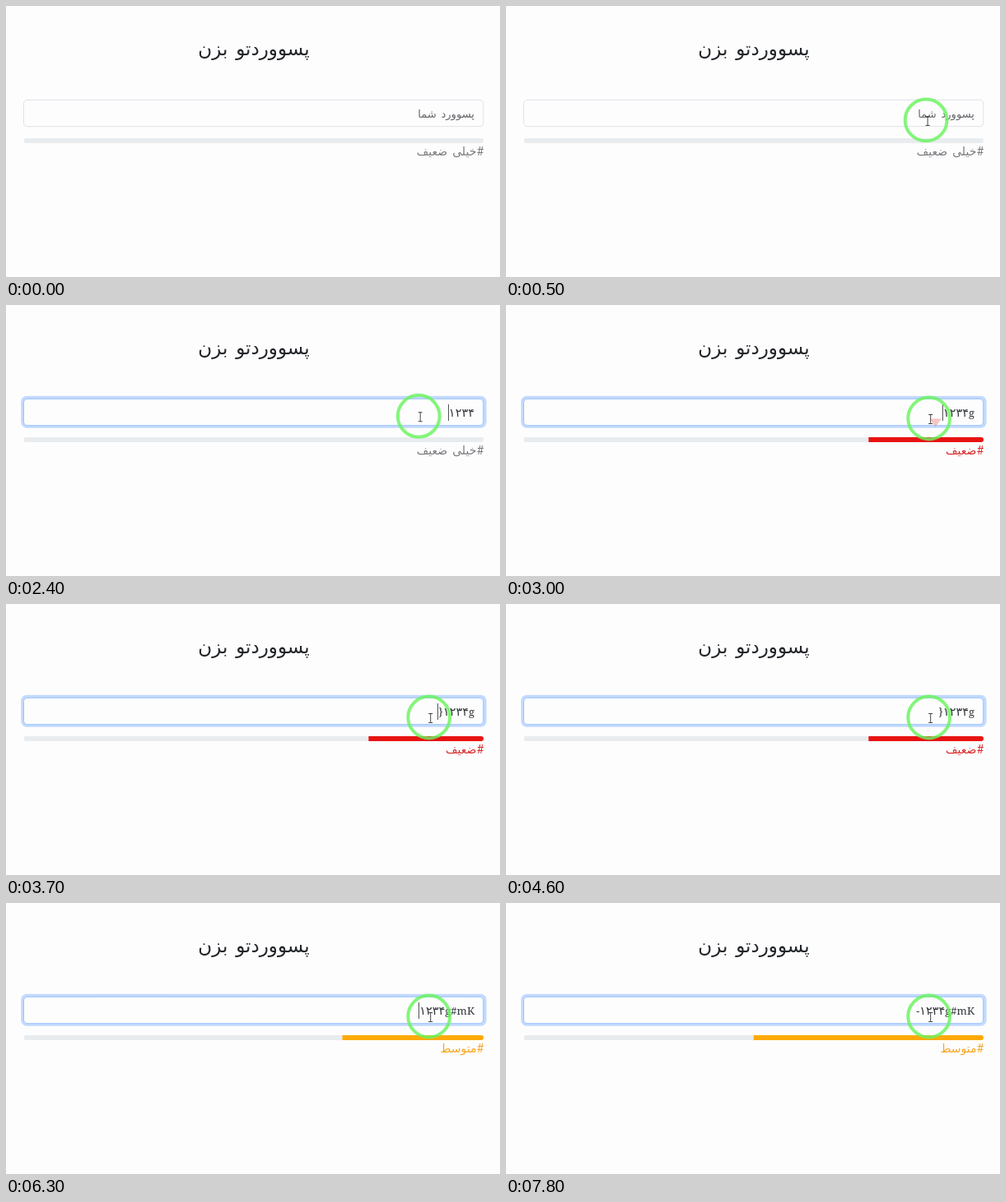
These frames come from a looping animation (600 px wide and 330 px high, 8 s). An HTML page with a canvas:

```html
<!DOCTYPE html>
<html lang="fa">
<head>
<meta charset="utf-8">
<style>
html, body { margin: 0; width: 100%; height: 100%; overflow: hidden; background: #fefdfe; }
canvas { display: block; }
</style>
</head>
<body>
<canvas id="stage" width="600" height="330"></canvas>
<script>
const LOOP = 8000, LEFT = 21.5, RIGHT = 580, BLINK = 250;
const SANS = 'Roboto, "DejaVu Sans", sans-serif', SERIF = '"Noto Serif", serif';
const DIGITS = '"DejaVu Sans", sans-serif';
const ctx = document.getElementById('stage').getContext('2d');

// time, digits, Latin letters, trailing neutral sign
const keys = [
  [960, '۱', '', ''], [1400, '۱۲', '', ''], [1800, '۱۲۳', '', ''], [2200, '۱۲۳۴', '', ''],
  [2500, '۱۲۳۴', 'g', ''], [3700, '۱۲۳۴', 'g', '}'], [4800, '۱۲۳۴', 'g', ''],
  [5100, '۱۲۳۴', 'g', '#'], [5800, '۱۲۳۴', 'g#m', ''], [6200, '۱۲۳۴', 'g#mK', ''],
  [7400, '۱۲۳۴', 'g#mK', '-']
];
const levels = [
  { at: 0, from: 0, to: 0, bar: '#e9ecef', color: '#777a7d', label: '#خیلی ضعیف' },
  { at: 2550, from: 0, to: .25, bar: '#e81313', color: '#d62a2a', label: '#ضعیف' },
  { at: 6250, from: .25, to: .5, bar: '#ffa908', color: '#f5a623', label: '#متوسط' }
];
// time, x, y of the pointer
const path = [[100, 630, 170], [600, 496.5, 136], [1000, 496.5, 135], [1500, 498.5, 135],
  [2300, 500, 135.5], [2850, 513.7, 138.5]];

const clamp = v => Math.max(0, Math.min(1, v));
const smooth = v => v * v * (3 - 2 * v);

// CSS "ease" timing: cubic-bezier(.25, .1, .25, 1)
function ease(x) {
  let lo = 0, hi = 1;
  for (let i = 0; i < 20; i++) {
    const m = (lo + hi) / 2;
    if (.75 * m * (1 - m) + m ** 3 < x) lo = m; else hi = m;
  }
  return .3 * lo * (1 - lo) ** 2 + 3 * lo * lo * (1 - lo) + lo ** 3;
}

// Persian text, with slightly wide word gaps
function persian(str, x, y, size, color, align = 'right') {
  ctx.font = `${size}px ${SANS}`;
  ctx.wordSpacing = size * .18 + 'px';
  ctx.fillStyle = color;
  ctx.textAlign = align;
  ctx.direction = 'rtl';
  ctx.fillText(str, x, y);
}

// One run of typed characters ending at x; returns its left edge
function typed(str, x, size, family) {
  ctx.font = `${size}px ${family}`;
  ctx.fillStyle = '#33373b';
  ctx.textAlign = 'right';
  ctx.direction = 'ltr';
  ctx.fillText(str, x, 136);
  return x - ctx.measureText(str).width;
}

function box(x, y, w, h, r) {
  ctx.beginPath();
  ctx.roundRect(x, y, w, h, r);
}

function drawField(t) {
  const focus = clamp((t - 620) / 80);
  if (focus) {
    ctx.globalAlpha = focus;
    box(18.2, 110.8, 565.4, 39, 7);
    ctx.fillStyle = '#c2dafe';
    ctx.fill();
    ctx.globalAlpha = 1;
  }
  box(21.5, 114.3, 558.2, 32.4, 4.5);
  ctx.fillStyle = '#fefdfe';
  ctx.fill();
  ctx.lineWidth = 1;
  ctx.strokeStyle = focus ? '#9cc3fb' : '#dfe2e8';
  ctx.stroke();

  const key = keys.findLast(k => k[0] <= t);
  let x = 569;
  if (key) {
    const [, digits, latin, sign] = key;
    x = typed(latin, x, 13, SERIF);
    x = typed(digits, x, 14.5, DIGITS);
    x = typed(sign, x, 13, SERIF);
  } else {
    persian('پسوورد شما', x, 136, 13.1, '#64676a');
  }
  const since = t - (key ? key[0] : 620);
  if (since >= 0 && since % (2 * BLINK) < BLINK) {
    ctx.fillStyle = '#555';
    ctx.fillRect(Math.round(x) - 1, 121, 1, 20);
  }
}

function drawStrength(t) {
  const { at, from, to, bar, color, label } = levels.findLast(l => l.at <= t);
  const width = (RIGHT - LEFT) * (from + (to - from) * ease(clamp((t - at) / 300)));
  ctx.save();
  box(LEFT, 161, RIGHT - LEFT, 6, 3);
  ctx.clip();
  ctx.fillStyle = '#e9ecef';
  ctx.fillRect(LEFT, 161, RIGHT - LEFT, 6);
  ctx.fillStyle = bar;
  ctx.fillRect(RIGHT - width, 161, width, 6);
  ctx.restore();
  persian(label, RIGHT, 182, 14, color);
}

function drawPointer(t) {
  if (t < path[0][0]) return;
  const i = path.findLastIndex(p => p[0] <= t);
  const a = path[i], b = path[i + 1] || a;
  const f = b === a ? 0 : smooth((t - a[0]) / (b[0] - a[0]));
  const x = a[1] + (b[1] - a[1]) * f, y = a[2] + (b[2] - a[2]) * f;

  if (t > 2850 && t < 3200) {
    ctx.fillStyle = 'rgba(240, 110, 100, .4)';
    ctx.beginPath();
    ctx.moveTo(x + 1, y);
    ctx.lineTo(x + 15, y);
    ctx.lineTo(x + 8, y + 10);
    ctx.fill();
  }
  ctx.strokeStyle = 'rgba(105, 245, 95, .82)';
  ctx.lineWidth = 4;
  ctx.beginPath();
  ctx.arc(x, y - .5, 25.4, 0, 2 * Math.PI);
  ctx.stroke();

  ctx.save();
  ctx.translate(x + 2, y + .5);
  ctx.strokeStyle = '#444';
  ctx.lineWidth = 1;
  ctx.beginPath();
  if (x < RIGHT) {
    ctx.moveTo(-2.5, -5.5); ctx.lineTo(2.5, -5.5);
    ctx.moveTo(0, -5.5); ctx.lineTo(0, 5.5);
    ctx.moveTo(-2.5, 5.5); ctx.lineTo(2.5, 5.5);
    ctx.stroke();
  } else {
    ctx.moveTo(-2, -6); ctx.lineTo(-2, 6); ctx.lineTo(1, 3); ctx.lineTo(6, 3);
    ctx.closePath();
    ctx.fillStyle = '#fff';
    ctx.fill();
    ctx.stroke();
  }
  ctx.restore();
}

function frame(now) {
  const t = now % LOOP;
  ctx.fillStyle = '#fefdfe';
  ctx.fillRect(0, 0, 600, 330);
  persian('پسووردتو بزن', 301, 60, 23, '#212529', 'center');
  drawField(t);
  drawStrength(t);
  drawPointer(t);
  requestAnimationFrame(frame);
}
requestAnimationFrame(frame);
</script>
</body>
</html>
```
